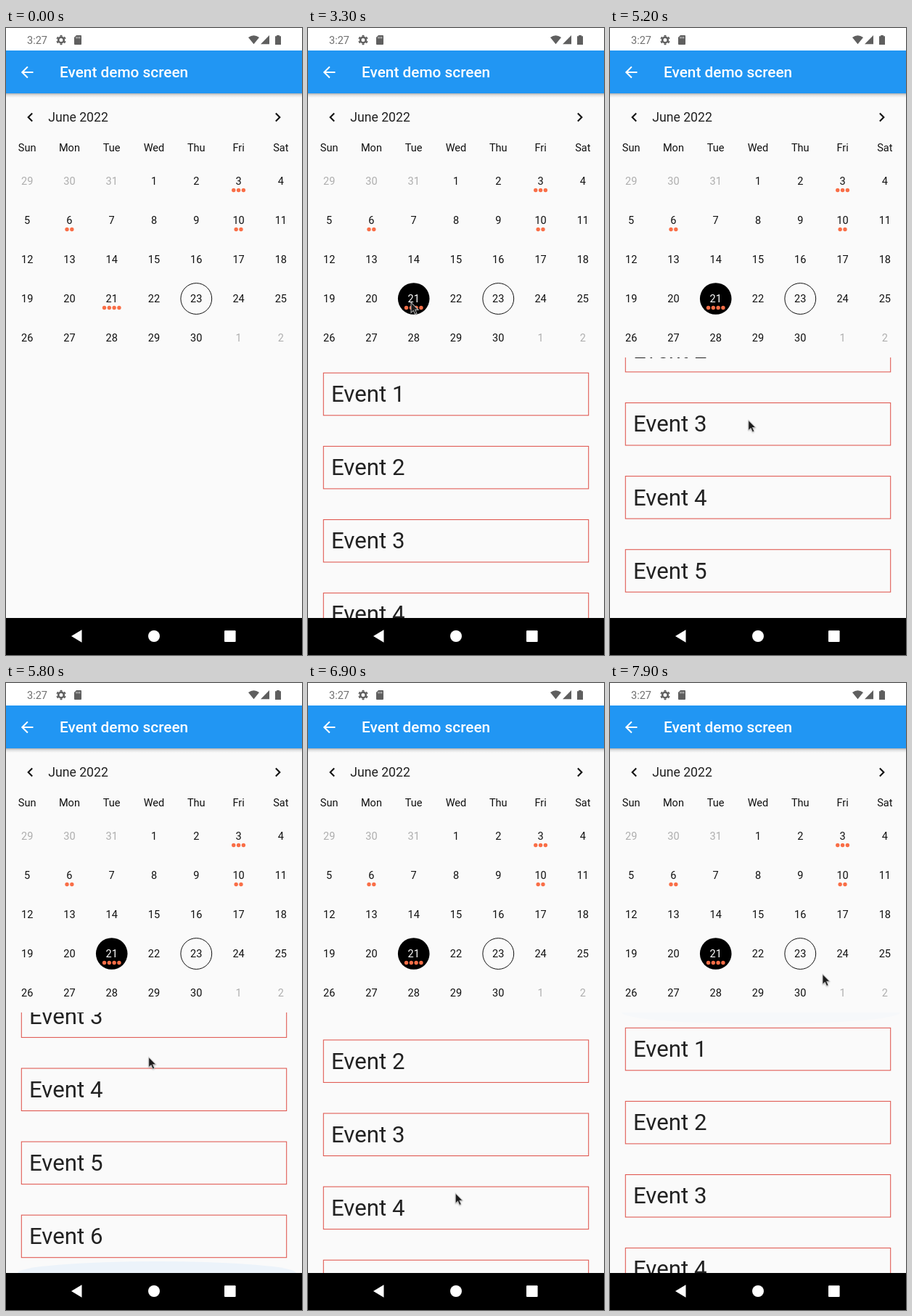
Write an HTML page that moves like this. It is 408 px wide and 864 px high and loops after 8000 ms.

```html
<!DOCTYPE html>
<html lang="en">
<head>
<meta charset="utf-8">
<title>Event calendar</title>
<style>
  html, body { margin: 0; width: 100%; height: 100%; overflow: hidden; background: #fafafa; }
  svg { display: block; width: 100vw; height: 100vh; }
  text { font-family: Roboto, "Liberation Sans", sans-serif; font-size: 14.55px; fill: #111; }
  .mid { text-anchor: middle; }
  .title { font-size: 20.8px; font-weight: 500; fill: #fff; }
  .month { font-size: 17.66px; fill: #222; }
  .card { font-size: 31.2px; fill: #222; }
  .outside { fill: #aeaeae; }
</style>
</head>
<body>
<svg viewBox="0 0 408 864">
  <defs>
    <linearGradient id="shade" x2="0" y2="1">
      <stop offset="0" stop-opacity=".3"/>
      <stop offset=".4" stop-opacity=".11"/>
      <stop offset="1" stop-opacity="0"/>
    </linearGradient>
    <clipPath id="viewport"><rect y="454" width="408" height="359"/></clipPath>
    <filter id="soft" x="-50%" y="-50%" width="200%" height="200%"><feGaussianBlur stdDeviation="1"/></filter>
    <path id="arrow" d="M0 0V14.3L3.3 11.3L5.6 16.5L8 15.4L5.8 10.4H10.2Z"/>
  </defs>
  <rect width="408" height="864" fill="#fafafa"/>

  <rect y="90" width="408" height="6" fill="url(#shade)"/>
  <rect width="408" height="31" fill="#fff"/>
  <rect y="31" width="408" height="59" fill="#2196f3"/>
  <text x="29" y="22" style="fill:#707070">3:27</text>
  <g fill="#5f5f5f">
    <g fill="none" stroke="#5f5f5f">
      <circle cx="76" cy="16.5" r="3.8" stroke-width="2.6"/>
      <circle cx="76" cy="16.5" r="5.8" stroke-width="2" pathLength="60" stroke-dasharray="5" stroke-dashoffset="-2.5"/>
    </g>
    <path d="M97 10H103Q104 10 104 11V22Q104 23 103 23H95Q94 23 94 22V13Z"/>
    <path d="M97 12v2.5M99.3 12v2.5M101.6 12v2.5" stroke="#fff" stroke-width=".8"/>
    <path d="M334 13Q341.5 7.5 349 13L341.5 22.3Z"/>
    <path d="M351 22.3H363V10Z"/>
    <path d="M373 10H377V11.3H379V23H371V11.3H373Z"/>
  </g>
  <path transform="translate(16.7 48.5) scale(1.039)" fill="#fff" d="M20 11H7.83l5.59-5.59L12 4l-8 8 8 8 1.41-1.41L7.83 13H20z"/>
  <text class="title" x="74" y="68.3">Event demo screen</text>

  <path transform="translate(20.9 110.6) scale(1.039)" fill="#111" d="M15.41 7.41L14 6l-6 6 6 6 1.41-1.41L10.83 12z"/>
  <path transform="translate(362.2 110.6) scale(1.039)" fill="#111" d="M10 6L8.59 7.41 13.17 12l-4.58 4.59L10 18l6-6z"/>
  <text class="month" x="58.2" y="129.3">June 2022</text>
  <g id="calendar"></g>

  <g clip-path="url(#viewport)">
    <g id="events"></g>
    <ellipse id="topGlow" cx="208" cy="454" rx="192" ry="16" fill="#2196f3"/>
    <ellipse id="bottomGlow" cx="208" cy="813" rx="192" ry="16" fill="#2196f3"/>
  </g>

  <rect y="813" width="408" height="51"/>
  <g fill="#fff">
    <path d="M90 838L104.5 829.3V846.7Z"/>
    <circle cx="204" cy="838" r="8"/>
    <rect x="301" y="830.3" width="15.6" height="15.6" rx="1"/>
  </g>
  <g id="cursor">
    <use href="#arrow" y="1" opacity=".35" filter="url(#soft)"/>
    <use href="#arrow" fill="#1c1c1c" stroke="#ddd" stroke-opacity=".75" stroke-width="1.1"/>
  </g>
</svg>
<script>
const LOOP = 8000, STEP = 100;
const PITCH = 101.1, CARDS = 6, LIST_HEIGHT = 359;
const MAX_SCROLL = CARDS * PITCH - LIST_HEIGHT;
const byId = id => document.getElementById(id);
const set = (node, attrs) => { for (const key in attrs) node.setAttribute(key, attrs[key]); };
const ramp = (t, from, to) => Math.min(1, Math.max(0, (t - from) / (to - from)));

function add(parent, name, attrs, text = "") {
  const node = document.createElementNS("http://www.w3.org/2000/svg", name);
  set(node, attrs);
  node.textContent = text;
  parent.append(node);
  return node;
}

const calendar = byId("calendar");
const columnX = col => 408 / 7 * (col + .5);
const markers = { 3: 3, 6: 2, 10: 2, 21: 4 };
const selectable = {};

["Sun", "Mon", "Tue", "Wed", "Thu", "Fri", "Sat"].forEach((name, col) =>
  add(calendar, "text", { class: "mid", x: columnX(col), y: 170 }, name));

for (let cell = 0; cell < 35; cell++) {
  const date = new Date(2022, 4, 29 + cell);
  const day = date.getDate(), inMonth = date.getMonth() === 5;
  const x = columnX(cell % 7), y = 211 + 54 * Math.floor(cell / 7);
  const disc = add(calendar, "circle", { cx: x, cy: y, r: 21.8, visibility: "hidden" });
  if (inMonth && day === 23) add(calendar, "circle", { cx: x, cy: y, r: 21.4, fill: "none", stroke: "#111" });
  const label = add(calendar, "text", { class: inMonth ? "mid" : "mid outside", x, y: y + 5.2 }, day);
  if (inMonth) selectable[day] = { disc, label };
  const count = inMonth && markers[day] || 0;
  for (let i = 0; i < count; i++)
    add(calendar, "circle", { cx: x + (i - (count - 1) / 2) * 6.8, cy: y + 12.5, r: 2.7, fill: "#f96e47" });
}

const cards = Array.from({ length: CARDS }, (_, i) => {
  const card = add(byId("events"), "g", { transform: `translate(0 ${474.8 + PITCH * i})` });
  add(card, "rect", { x: 21.3, y: .5, width: 365.4, height: 58.5, fill: "none", stroke: "#df544c", "stroke-width": 1.04 });
  add(card, "text", { class: "card", x: 32, y: 40.4 }, `Event ${i + 1}`);
  return card;
});

// Pointer glides: to day 6, to day 21, into the list, drag up, drag down, leave
const glides = [
  { from: 300, to: 1100, x: 92, y: 278 },
  { from: 2200, to: 2700, x: 142, y: 378 },
  { from: 3900, to: 4400, x: 183, y: 762 },
  { from: 4500, to: 4700, x: 184, y: 660 },
  { from: 4700, to: 5510, x: 195, y: 466 },
  { from: 5510, to: 7200, x: 205, y: 754 },
  { from: 7200, to: 7900, x: 293, y: 401 }
];

function pointerAt(t) {
  let x = 356, y = 440;
  for (const glide of glides) {
    const p = ramp(t, glide.from, glide.to);
    x += (glide.x - x) * p;
    y += (glide.y - y) * p;
  }
  return { x, y };
}

const scrollAt = t => MAX_SCROLL * (ramp(t, 4518, 5567) - ramp(t, 6340, 7190));
const glowAt = (t, hit) => .07 * (ramp(t, hit, hit + 150) - ramp(t, hit + 250, hit + 850));

function render(t) {
  const selected = t < 1600 ? 0 : t < 3300 ? 6 : 21;
  for (const day in selectable) {
    const { disc, label } = selectable[day], on = +day === selected;
    set(disc, { visibility: on ? "visible" : "hidden" });
    label.style.fill = on ? "#fff" : "";
  }
  const shown = selected === 21 ? CARDS : markers[selected] || 0;
  cards.forEach((card, i) => set(card, { visibility: i < shown ? "visible" : "hidden" }));
  set(byId("events"), { transform: `translate(0 ${-scrollAt(t)})` });
  set(byId("bottomGlow"), { opacity: glowAt(t, 5500) });
  set(byId("topGlow"), { opacity: glowAt(t, 7200) });

  const { x, y } = pointerAt(t);
  set(byId("cursor"), { transform: `translate(${x} ${y})`, visibility: t < 300 ? "hidden" : "visible" });
}

const start = performance.now();
function frame() {
  const t = (performance.now() - start) % LOOP;
  render(Math.floor(t / STEP) * STEP);
  requestAnimationFrame(frame);
}
frame();
</script>
</body>
</html>
```
